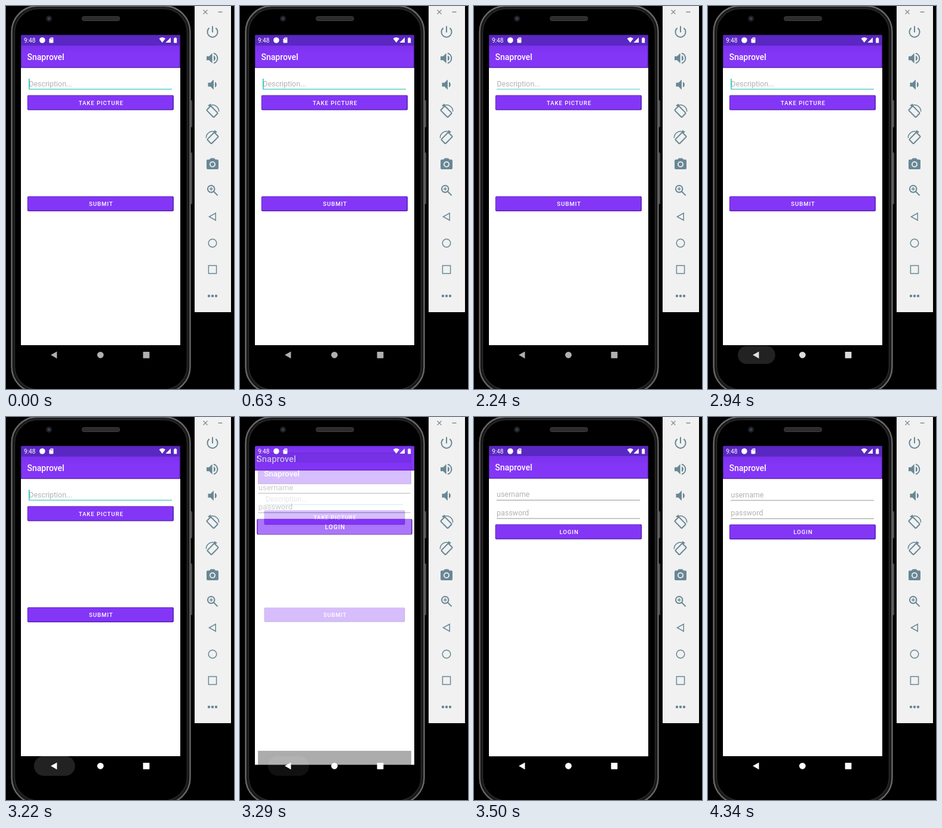
An HTML page that plays this animation: 382 px wide and 638 px high, repeating every 4.55 s.

```html
<!DOCTYPE html>
<html lang="en">
<head>
<meta charset="utf-8">
<title>Phone login demo</title>
<style>
  html, body { margin: 0; width: 100%; height: 100%; overflow: hidden; background: #000; }
  svg { display: block; width: 382px; height: 638px; }
  text { font-family: Roboto, sans-serif; }
  .title { font-size: 14px; font-weight: 500; fill: #fff; }
  .hint { font-size: 12.4px; fill: #b2b2b2; }
  .label { font-size: 9.7px; font-weight: 500; letter-spacing: .87px; fill: #fff; text-anchor: middle; }
  .line { fill: none; stroke: #688795; stroke-width: 2; }
  .thin { stroke-width: 1.5; }
  .solid { fill: #688795; }
</style>
</head>
<body>
<svg viewBox="0 0 382 638">
  <defs>
    <linearGradient id="bar" x1="0" y1="0" x2="0" y2="1">
      <stop offset="0" stop-color="#702de0"/>
      <stop offset=".6" stop-color="#8436f7"/>
      <stop offset="1" stop-color="#8436f7"/>
    </linearGradient>
    <clipPath id="screen"><path d="M25 600V52q0-4 4-4H288q4 0 4 4V600z"/></clipPath>
  </defs>

  <rect width="382" height="638"/>

  <g id="phone">
    <path d="M308 157h3q1 0 1 2v41q0 2-1 2h-3zM308 244h3q1 0 1 2v82q0 2-1 2h-3z" fill="#4a4a4a"/>
    <rect x="9.5" y="0" width="299" height="644" rx="43" fill="#181818" stroke="#686868" stroke-width="2.4"/>
    <rect x="14.5" y="4.5" width="289" height="634.5" rx="39" fill="#000" stroke="#2c2c2c" stroke-width="1.4"/>
    <circle cx="72" cy="21" r="5" fill="#1d1f24"/>
    <circle cx="72" cy="21" r="2.2" fill="#39414d"/>
    <rect x="127.5" y="17.5" width="63" height="7" rx="3" fill="#2c2c2c" stroke="#454545" stroke-width=".9"/>
  </g>

  <g clip-path="url(#screen)">
    <g id="login"></g>
    <g id="post"></g>
  </g>

  <g id="status" fill="#fff">
    <text x="30" y="61" font-size="10">9:48</text>
    <circle cx="60.8" cy="57" r="4.8"/>
    <path d="M75 52.6h3.6q.8 0 .8.8v7.2q0 .8-.8.8h-5.4q-.8 0-.8-.8V55.2z"/>
    <path d="M75 53.8v1.8M76.5 53.8v1.8M78 53.8v1.8" stroke="#5f27c4" stroke-width=".7"/>
    <path d="M256.6 54.3q5.2-4 10.4 0L261.8 61z"/>
    <path d="M276 52.4v8.6h-8.6z"/>
    <path d="M282.6 52.4h2.2v1h1.4v8h-5v-8h1.4z"/>
  </g>

  <rect id="ripple" fill="#fff"/>
  <g id="nav" fill="#fff">
    <path d="M85.4 575.4v11.8L75 581.3z"/>
    <circle cx="158.2" cy="581.3" r="5.4"/>
    <rect x="229.6" y="576" width="10.8" height="10.8" rx=".8"/>
  </g>

  <rect x="316" width="61" height="510" fill="#f1f1f1"/>
  <path d="M330.5 6.5l7 7m0-7l-7 7M355.5 10h7" stroke="#858c90" stroke-width="1.3"/>
  <g id="tools"></g>
</svg>

<script>
const LOOP = 4550, STEP = 70;
const PRESS = 2870, LEAVE = 3220;
const BLINKS = [70, 560, 1050, 1610, 2100, 2660];
const SETTLE = [0, .38, .87, .95, .98, 1];
const CENTER = [158.5, 329.5];
const el = id => document.getElementById(id);
const clamp = v => Math.max(0, Math.min(1, v));

const rect = (x, y, w, h, fill, rx = 0) =>
  `<rect x="${x}" y="${y}" width="${w}" height="${h}" rx="${rx}" fill="${fill}"/>`;

// A block with a dark rim, heavier on the right and below.
const block = (x, y, w, h, fill, rx) =>
  rect(x, y, w, h, '#5a23b6', rx) + rect(x + .8, y + .8, w - 2.4, h - 2.2, fill, rx);

const button = (y, label) =>
  block(35.8, y, 245.2, 25, '#8436f7', 2) +
  `<text class="label" x="159.3" y="${y + 16}">${label}</text>`;

const hint = (y, label) => `<text class="hint" x="38.3" y="${y}">${label}</text>`;
const field = (y, label) => hint(y, label) + rect(38, y + 4.7, 240, 1, '#969696');

const page = body =>
  rect(25, 48, 267, 517, '#fff') +
  block(25, 48, 267, 55.2, 'url(#bar)', 0) +
  rect(25, 48, 267, 17.5, '#4e20a4') +
  rect(25.8, 49.5, 264.6, 16, '#5b27c2') +
  rect(25, 565, 267, 46, '#000') +
  `<text class="title" x="35.5" y="89.8">Snaprovel</text>${body}`;

el('login').innerHTML = page(
  field(133.7, 'username') + field(164.2, 'password') + button(179, 'LOGIN'));

el('post').innerHTML = page(
  hint(133.7, 'Description...') +
  `<rect id="under" x="38" y="137.8" width="240" height="1.6"/>
   <rect id="caret" x="38" y="121" width="1.5" height="17" fill="#27c3b3"/>` +
  button(148.5, 'TAKE PICTURE') + button(317, 'SUBMIT'));

const turn =
  `<rect class="line" x="-8.5" y="-5" width="17" height="10" rx="1.2" transform="translate(-.5 1) rotate(45)"/>
   <path class="line thin" d="M-4-9.4A10.6 10.6 0 0 1 10.6 1"/>
   <path class="solid" d="M-3-12.4v6L-8-9.2z"/>`;

const tools = [
  '<path class="line" d="M-5.4-6.4A8.6 8.6 0 1 0 5.4-6.4M0-9.6V1"/>',
  `<path class="solid" d="M-10-3.2h4.3l5.3-5.3v17l-5.3-5.3H-10zM2-4.4a4.8 4.8 0 0 1 0 8.8z"/>
   <path class="line" d="M2-8.3a8.6 8.6 0 0 1 0 16.6"/>`,
  '<path class="solid" d="M-7.5-3.2h4.2l5.2-5.3v17l-5.2-5.3h-4.2zM4-4.4a4.8 4.8 0 0 1 0 8.8z"/>',
  turn,
  `<g transform="scale(-1 1)">${turn}</g>`,
  `<path class="solid" d="M-3-9.5h6l2 2.2h3q2 0 2 2V7q0 2-2 2H-8q-2 0-2-2V-5.3q0-2 2-2h3z"/>
   <circle cy=".8" r="4.1" fill="none" stroke="#f1f1f1" stroke-width="1.8"/>`,
  `<circle class="line" cx="-2.3" cy="-2.3" r="5.8"/>
   <path class="line" d="M2 2l6.6 6.6"/>
   <path class="line thin" d="M-5.2-2.3h5.8M-2.3-5.2v5.8"/>`,
  '<path class="line thin" d="M5.2-6v12L-5.6 0z"/>',
  '<circle class="line thin" r="6.8"/>',
  '<rect class="line thin" x="-6.6" y="-6.6" width="13.2" height="13.2"/>',
  [-6, 0, 6].map(x => `<circle class="solid" cx="${x}" r="2.2"/>`).join('')
];
el('tools').innerHTML = tools.map((icon, i) =>
  `<g transform="translate(346 ${43 + i * 44})">${icon}</g>`).join('');

function zoom(id, s, alpha) {
  const [x, y] = CENTER;
  const node = el(id);
  node.setAttribute('transform', `translate(${x} ${y}) scale(${s}) translate(${-x} ${-y})`);
  node.setAttribute('opacity', alpha);
}

function drawRipple(t) {
  const grow = t < PRESS ? 0 : 1 - Math.pow(400, -clamp((t - PRESS + STEP) / 350));
  const fade = 1 - clamp((t - LEAVE) / (2 * STEP));
  const w = 69 * grow, h = 33 * grow, node = el('ripple');
  const box = { x: 81.3 - w / 2, y: 581.3 - h / 2, width: w, height: h, rx: h / 2, opacity: .135 * fade };
  for (const key in box) node.setAttribute(key, box[key]);
}

function draw(t) {
  const caretOn = BLINKS.filter(b => b <= t).length % 2 === 0 && t <= LEAVE;
  el('caret').setAttribute('opacity', caretOn ? 1 : 0);
  el('under').setAttribute('fill', caretOn ? '#62d2c4' : '#86dccd');

  const i = Math.max(0, (t - LEAVE) / STEP);
  const p = SETTLE[Math.min(i, SETTLE.length - 1)];
  zoom('login', 1.1 - .1 * p, i > 0 ? 1 : 0);
  zoom('post', 1 - .1 * p, i === 0 ? 1 : i === 1 ? .32 : 0);

  drawRipple(t);
  el('nav').setAttribute('opacity', .69 + .31 * clamp((t - PRESS + STEP) / 250));
}

const start = performance.now();
function tick() {
  const t = (performance.now() - start) % LOOP;
  draw(Math.floor(t / STEP) * STEP);
  requestAnimationFrame(tick);
}
tick();
</script>
</body>
</html>
```
